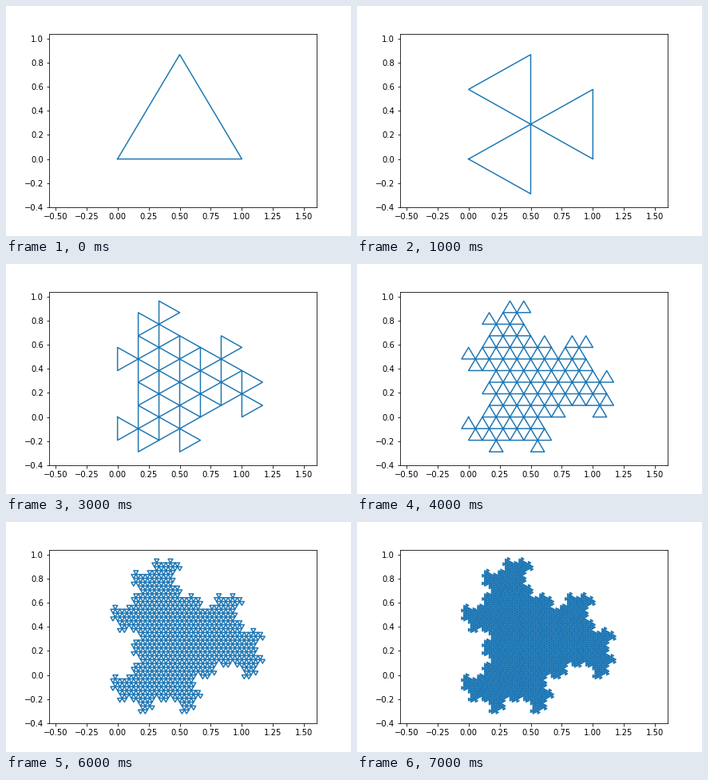
A matplotlib script that plays this animation: 432x288 px, repeating every 8000 ms.

```python
import matplotlib.pyplot as plt
import numpy as np
from matplotlib.animation import FuncAnimation

STEPS = 8
# Bend of the first third of a segment: 30 degrees clockwise, 1/sqrt(3) long
BEND = np.exp(-1j * np.pi / 6) / np.sqrt(3)


def refine(points):
    """Replace every segment with the three-part terdragon zigzag."""
    start, span = points[:-1], np.diff(points)
    first = start + BEND * span
    second = points[1:] - BEND * span
    zigzag = np.column_stack([start, first, second]).ravel()
    return np.append(zigzag, points[-1])


curves = [np.array([0, 1, np.exp(1j * np.pi / 3), 0])]
while len(curves) < STEPS:
    curves.append(refine(curves[-1]))

fig, ax = plt.subplots(figsize=(6, 4), dpi=72)
fig.subplots_adjust(left=0.125, right=0.9, bottom=0.125, top=0.88)
ax.set_xlim(-0.55, 1.6)
ax.set_ylim(-0.4, 1.04)
line, = ax.plot([], [], color="C0", lw=1.5)


def update(step):
    points = curves[step]
    line.set_data(points.real, points.imag)
    return line,


anim = FuncAnimation(fig, update, frames=STEPS, interval=1000, repeat=True)
plt.show()
```
